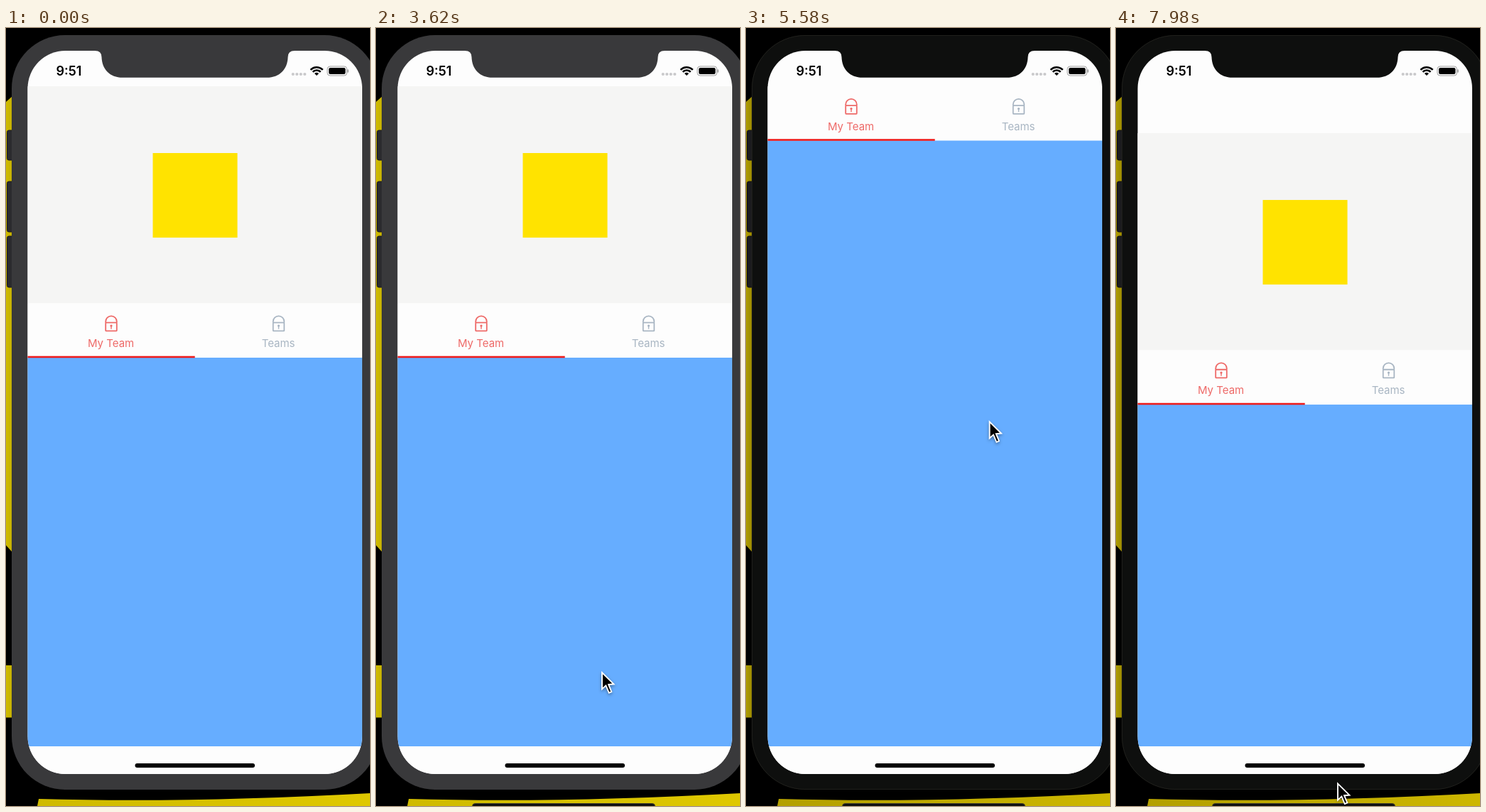
An HTML page with a canvas for the animation above (8000 ms loop, 512 by 1095 pixels).

```html
<!DOCTYPE html>
<html lang="en">
<head>
<meta charset="utf-8">
<title>Sticky tabs demo</title>
<style>
  html, body { margin: 0; width: 100%; height: 100%; overflow: hidden; background: #000; }
  canvas { display: block; width: 512px; height: 1095px; }
</style>
</head>
<body>
<canvas id="stage"></canvas>
<script>
const W = 512, H = 1095, LOOP = 8000;
const canvas = document.getElementById('stage');
const ctx = canvas.getContext('2d');
const dpr = window.devicePixelRatio || 1;
canvas.width = W * dpr;
canvas.height = H * dpr;

const BAR_TIME = 1000, PRESS = 3900, TURN = 5020, TOP_REACHED = 6000;
const HEADER = { top: 82, bottom: 387.5 };
const FONT = 'Inter, Roboto, sans-serif';

// time, x, y of the pointer tip
const POINTER = [
  [0, 560, 1135], [800, 545, 1115], [1240, 499, 1029], [2300, 360, 935],
  [3500, 317, 905], [PRESS, 317, 905], [TURN, 333, 676], [TOP_REACHED, 345, 504],
  [6740, 345, 504], [7440, 312, 907], [7980, 311, 1061], [LOOP, 311, 1063]
];

const clamp = (v, lo, hi) => Math.min(hi, Math.max(lo, v));

// Monotone cubic through the pointer keys
function track(t, axis) {
  const last = POINTER.length - 1;
  const secant = i => (POINTER[i + 1][axis] - POINTER[i][axis]) / (POINTER[i + 1][0] - POINTER[i][0]);
  const slope = i => {
    if (i === 0 || i === last) return 0;
    const a = secant(i - 1), b = secant(i);
    return a * b <= 0 ? 0 : 2 * a * b / (a + b);
  };
  let i = 0;
  while (i < last - 1 && t >= POINTER[i + 1][0]) i++;
  const p = POINTER[i], q = POINTER[i + 1], span = q[0] - p[0];
  const u = (t - p[0]) / span, u2 = u * u, u3 = u2 * u;
  return p[axis] * (2 * u3 - 3 * u2 + 1) + q[axis] * (3 * u2 - 2 * u3)
    + span * (slope(i) * (u3 - 2 * u2 + u) + slope(i + 1) * (u3 - u2));
}

// Content offset while dragging, with a rubber band past the top
function scrollAt(t, y) {
  if (t < PRESS) return 0;
  const anchor = 878 + 49 * clamp((t - TURN) / (TOP_REACHED - TURN), 0, 1);
  const pull = y - anchor;
  if (pull <= 0) return Math.max(pull, HEADER.top - HEADER.bottom);
  if (t < TURN) return 0;
  const reach = 930;
  return reach * (1 - 1 / (pull * 0.53 / reach + 1));
}

function rect(x, y, w, h, color) {
  ctx.fillStyle = color;
  ctx.fillRect(x, y, w, h);
}

function round(x, y, w, h, r, fill, stroke) {
  ctx.beginPath();
  ctx.roundRect(x, y, w, h, r);
  if (fill) { ctx.fillStyle = fill; ctx.fill(); }
  if (stroke) { ctx.strokeStyle = stroke; ctx.stroke(); }
}

function poly(points, fill) {
  ctx.beginPath();
  points.forEach(([x, y]) => ctx.lineTo(x, y));
  ctx.closePath();
  ctx.fillStyle = fill;
  ctx.fill();
}

function label(text, x, y, size, weight, color, align = 'center') {
  ctx.font = `${weight} ${size}px ${FONT}`;
  ctx.textAlign = align;
  ctx.fillStyle = color;
  ctx.fillText(text, x, y);
}

function fade(x0, y0, x1, y1, from, to) {
  const g = ctx.createLinearGradient(x0, y0, x1, y1);
  g.addColorStop(0, from);
  g.addColorStop(1, to);
  return g;
}

function backdrop(active) {
  rect(0, 0, W, H, '#000');
  const side = active ? fade(0, 0, 9, 0, '#ae9b00', '#9a8900') : fade(0, 0, 9, 0, '#d0bb00', '#c4b000');
  poly([[0, 104], [9, 96], [9, 738], [0, 728]], side);
  rect(0, 897, 9, 73.5, side);
  ctx.beginPath();
  ctx.moveTo(46, 1085);
  ctx.quadraticCurveTo(260, 1091, W, 1077);
  ctx.lineTo(W, H);
  ctx.lineTo(44, H);
  ctx.closePath();
  ctx.fillStyle = active ? fade(44, 0, W, 0, '#b39f00', '#cdb700') : fade(44, 0, W, 0, '#cfba00', '#dfc800');
  ctx.fill();
}

function phoneBody(active) {
  const button = active ? '#1c1c1e' : '#2b2b2e';
  ctx.lineWidth = 1;
  [[144, 42], [216, 71], [293, 72]].forEach(([y, h]) =>
    round(1.5, y, 9, h, 2.5, button, active ? '#111' : '#1b1b1d'));
  round(8, 10, 515, 1062, 75, active ? '#0e0f0e' : '#39393b');
  if (active) round(8.5, 10.5, 514, 1061, 74.5, null, '#20201c');
}

function lock(x, y, color) {
  ctx.strokeStyle = ctx.fillStyle = color;
  ctx.lineWidth = 1.8;
  ctx.beginPath();
  ctx.moveTo(x - 7.8, y + 10);
  ctx.lineTo(x - 7.8, y + 8.5);
  ctx.arc(x, y + 8.5, 7.8, Math.PI, 0);
  ctx.lineTo(x + 7.8, y + 10);
  ctx.stroke();
  ctx.beginPath();
  ctx.roundRect(x - 7.8, y + 10, 15.6, 11.7, 1);
  ctx.stroke();
  ctx.beginPath();
  ctx.arc(x, y + 14.3, 1.6, 0, 7);
  ctx.fill();
  ctx.fillRect(x - 0.7, y + 14, 1.4, 5);
}

function tab(text, x, y, color) {
  lock(x, y + 17.2, color);
  label(text, x - 0.4, y + 61.5, 15, 400, color);
}

function content(scroll) {
  const top = HEADER.top + scroll;
  const tabs = Math.max(HEADER.top, HEADER.bottom + scroll);
  ctx.save();
  ctx.beginPath();
  ctx.rect(30, HEADER.top, 472, 930);
  ctx.clip();
  rect(30, top, 472, HEADER.bottom - HEADER.top, '#f5f5f4');
  rect(206.5, top + 94, 119, 119, '#ffe300');
  rect(30, tabs, 472, 77, '#fdfdfd');
  tab('My Team', 148, tabs, '#ee6a68');
  tab('Teams', 383.5, tabs, '#a9b6c3');
  rect(30, tabs + 76.5, 472, 1011 - tabs - 76.5, '#66adff');
  rect(30, tabs + 74.2, 235.7, 2.6, '#ee1c1c');
  ctx.restore();
  rect(30, 1011, 472, 40, '#fdfdfd');
}

function statusBar() {
  label('9:51', 70.5, 67, 18, 600, '#000', 'left');
  for (let i = 0; i < 4; i++) {
    ctx.beginPath();
    ctx.arc(403.7 + i * 5.5, 65, 2.1, 0, 7);
    ctx.fillStyle = '#c9c9cb';
    ctx.fill();
  }
  const wifi = (r, w) => {
    ctx.beginPath();
    ctx.arc(437, 67, r, -Math.PI * 0.76, -Math.PI * 0.24);
    ctx.lineWidth = w;
    ctx.strokeStyle = '#000';
    ctx.stroke();
  };
  wifi(11.8, 2.6);
  wifi(7.5, 2.6);
  wifi(2.1, 4.2);
  ctx.lineWidth = 1;
  round(452, 54, 27.5, 13, 3.8, null, '#9b9b9b');
  round(454, 56, 23.5, 9, 2.2, '#000');
  round(480.4, 58.3, 1.5, 4.4, 0.8, '#9b9b9b');
}

function notch(color) {
  ctx.beginPath();
  ctx.moveTo(125, 30);
  ctx.lineTo(125, 32);
  ctx.quadraticCurveTo(134.5, 32, 134.5, 41);
  ctx.bezierCurveTo(135, 58, 146, 69.8, 164, 69.8);
  ctx.lineTo(367, 69.8);
  ctx.bezierCurveTo(385, 69.8, 396, 58, 396.5, 41);
  ctx.quadraticCurveTo(396.5, 32, 406, 32);
  ctx.lineTo(406, 30);
  ctx.closePath();
  ctx.fillStyle = color;
  ctx.fill();
}

function pointer(x, y) {
  ctx.save();
  ctx.translate(x, y);
  ctx.shadowColor = 'rgba(0,0,0,.35)';
  ctx.shadowBlur = 4 * dpr;
  ctx.shadowOffsetY = 2 * dpr;
  poly([[0, 0], [0, 27.5], [6, 22], [10.3, 32], [15.5, 29.8], [11.5, 20], [19.5, 19.3]], '#fff');
  ctx.shadowColor = 'transparent';
  poly([[1.9, 4.5], [1.9, 23.3], [6.7, 18.9], [11.2, 29.6], [13.1, 28.8], [8.7, 18.2], [15.2, 17.6]], '#000');
  ctx.restore();
}

function draw(t) {
  const active = t >= PRESS;
  const x = track(t, 1), y = track(t, 2);
  ctx.setTransform(dpr, 0, 0, dpr, 0, 0);
  backdrop(active);
  phoneBody(active);

  ctx.save();
  ctx.beginPath();
  ctx.roundRect(30.5, 32, 470.5, 1018, 53);
  ctx.clip();
  rect(30, 32, 472, 1019, '#fdfdfd');
  content(scrollAt(t, y));
  statusBar();
  notch(active ? '#0e0f0e' : '#39393b');
  round(181.5, 1035, 168.5, 6, 3, '#000');
  ctx.restore();

  if (t >= BAR_TIME) {
    ctx.lineWidth = 1;
    round(135.5, 1091.5, 257, 20, 4, '#101010', '#3c3a30');
  }
  pointer(x, y);
}

const start = performance.now();
function tick() {
  draw((performance.now() - start) % LOOP);
  requestAnimationFrame(tick);
}
tick();
</script>
</body>
</html>
```
